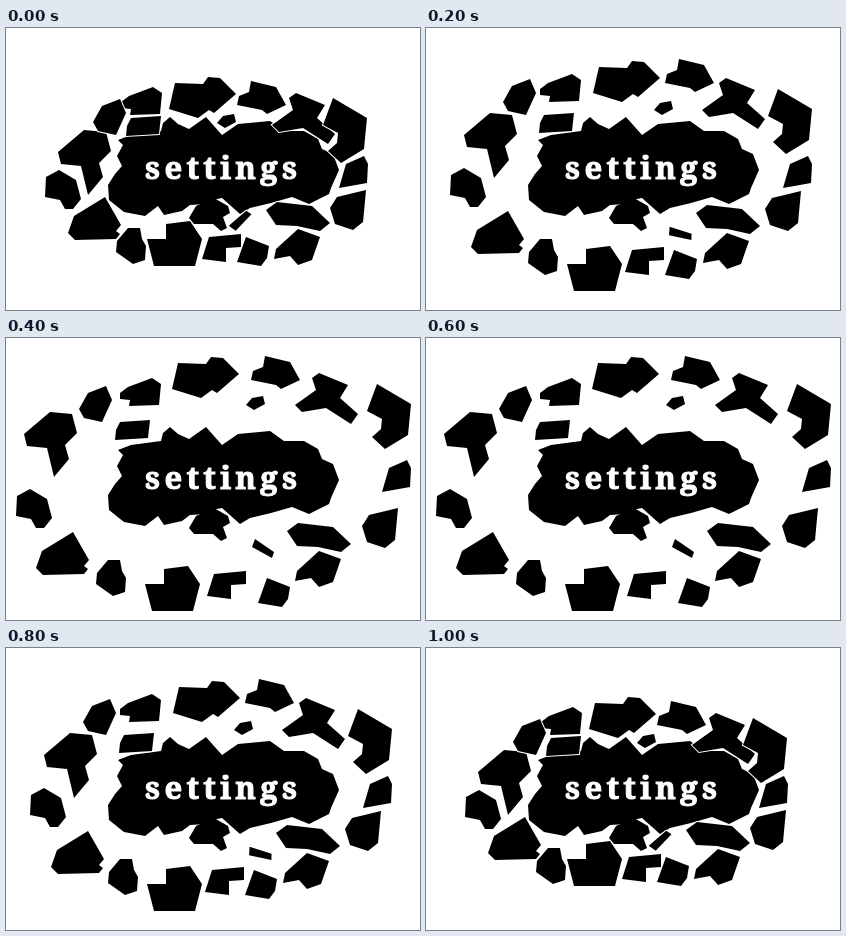
An HTML page that plays this animation: 414 px wide and 282 px high, repeating every 1100 ms.

```html
<!DOCTYPE html>
<html lang="en">
<head>
<meta charset="utf-8">
<title>settings</title>
<style>
  html, body { margin: 0; width: 100%; height: 100%; overflow: hidden; background: #fff; }
  svg { display: block; width: 414px; height: 282px; }
  .piece {
    stroke: #fff; stroke-width: 2; paint-order: stroke;
    transform-box: fill-box; transform-origin: center;
  }
  text {
    font: 900 31px "Noto Serif", "Liberation Serif", serif;
    letter-spacing: 4.3px;
    fill: #fff; stroke: #fff; stroke-width: 1;
  }
</style>
</head>
<body>
<svg viewBox="0 0 414 282">
  <!-- fixed core -->
  <path d="M112 112L125 107 155 103 157 95 164 89 172 96 183 101 200 89 216 107 232 96 264 93
    278 103 298 103 312 111 316 121 327 126 333 142 325 160 323 166 303 176 286 169 265 175
    244 180 234 186 216 170 206 172 200 176 184 177 176 183 158 187 152 178 139 188 118 184
    103 172 102 157 109 146 116 138 111 128 117 117Z"/>
  <path d="M183 190L190 178 208 170 222 178 224 185 217 189 221 200 215 203 207 196 188 196Z"/>
  <g id="rubble"></g>
  <text x="139" y="151">settings</text>
</svg>
<script>
const rubble = document.getElementById("rubble");
const pieces = [];

// Points are the spread-out shape; near, mid and far are [dx, dy, degrees]
// offsets for the three steps that start the burst.
function piece(points, near, mid, far) {
  const el = document.createElementNS("http://www.w3.org/2000/svg", "polygon");
  el.setAttribute("points", points);
  el.setAttribute("class", "piece");
  rubble.append(el);
  const scaled = k => far.map(v => v * k);
  pieces.push({ el, poses: [near, mid, far, scaled(.5), scaled(0), scaled(-.4)] });
}

// Top edge
piece("114,55 122,49 146,40 155,46 153,67 123,68 124,62 114,61", [1, 19], [3, 10], [0, 6]);
piece("110,92 114,84 144,82 142,100 109,102", [11, 6], [11, 6], [4, 3]);
piece("172,25 200,26 205,19 217,20 233,36 211,55 206,52 195,60 166,51", [-3, 30], [-3, 27], [1, 14]);
piece("259,18 284,24 294,42 275,51 270,47 245,42 247,33 257,29", [-14, 35], [-9, 27], [-6, 13]);
piece("240,67 246,60 257,58 259,66 248,72", [-29, 28], [-20, 22], [-12, 15]);

// Right side
piece("306,40 313,35 342,47 334,60 352,76 345,86 320,70 296,74 289,67 310,52", [-23, 30], [-18, 24], [-13, 15]);
piece("371,46 405,66 402,97 379,111 366,99 375,91 376,81 361,73", [-44, 24], [-31, 21], [-19, 15]);
piece("383,130 401,122 405,130 404,149 376,154", [-43, 6], [-31, 6], [-19, 6]);
piece("363,177 392,170 389,202 379,210 361,204 356,188", [-32, -8], [-30, -10], [-17, -7]);
piece("281,193 292,185 327,189 345,206 335,214 312,209 291,208", [-21, -11], [-16, -10], [-11, -8]);

// Bottom edge
piece("313,213 335,221 327,244 313,249 305,240 289,243 291,233", [-21, -12], [-18, -11], [-12, -8]);
piece("261,240 284,249 282,261 276,269 252,265", [-21, -31], [-18, -27], [-13, -18]);
piece("208,236 240,233 240,246 225,247 225,261 201,258", [-5, -27], [-2, -20], [-2, -14]);
piece("158,231 182,228 194,246 187,273 146,273 139,246 158,246", [2, -35], [2, -18], [2, -10]);
piece("249,201 268,214 266,220 246,209", [-23, -18, -75], [-12, -10, -57], [-3, -5, -17]);

// Left side
piece("91,235 102,222 114,222 116,233 120,240 119,254 107,258 90,246", [20, -22], [14, -16], [12, -11]);
piece("67,194 83,222 78,228 82,231 78,236 37,237 30,230 36,213", [32, -25], [22, -21], [15, -11]);
piece("11,158 24,151 41,161 46,180 38,190 30,190 25,181 10,178", [29, -9], [24, -10], [14, -11]);
piece("44,74 66,76 71,95 59,107 63,121 48,139 41,110 21,108 18,96", [34, 28], [22, 15], [20, 11]);
piece("100,48 106,62 96,84 78,80 73,71 82,55", [14, 23], [6, 8], [4, 3]);

const STEP = 100, STEPS = 11;

function draw(now) {
  const i = Math.floor(now / STEP) % STEPS;
  const pose = 5 - Math.abs(5 - i); // out, then back in
  for (const { el, poses } of pieces) {
    const [x, y, turn = 0] = poses[pose];
    el.style.transform = `translate(${x}px, ${y}px) rotate(${turn}deg)`;
  }
  requestAnimationFrame(() => draw(performance.now()));
}
draw(0);
</script>
</body>
</html>
```
